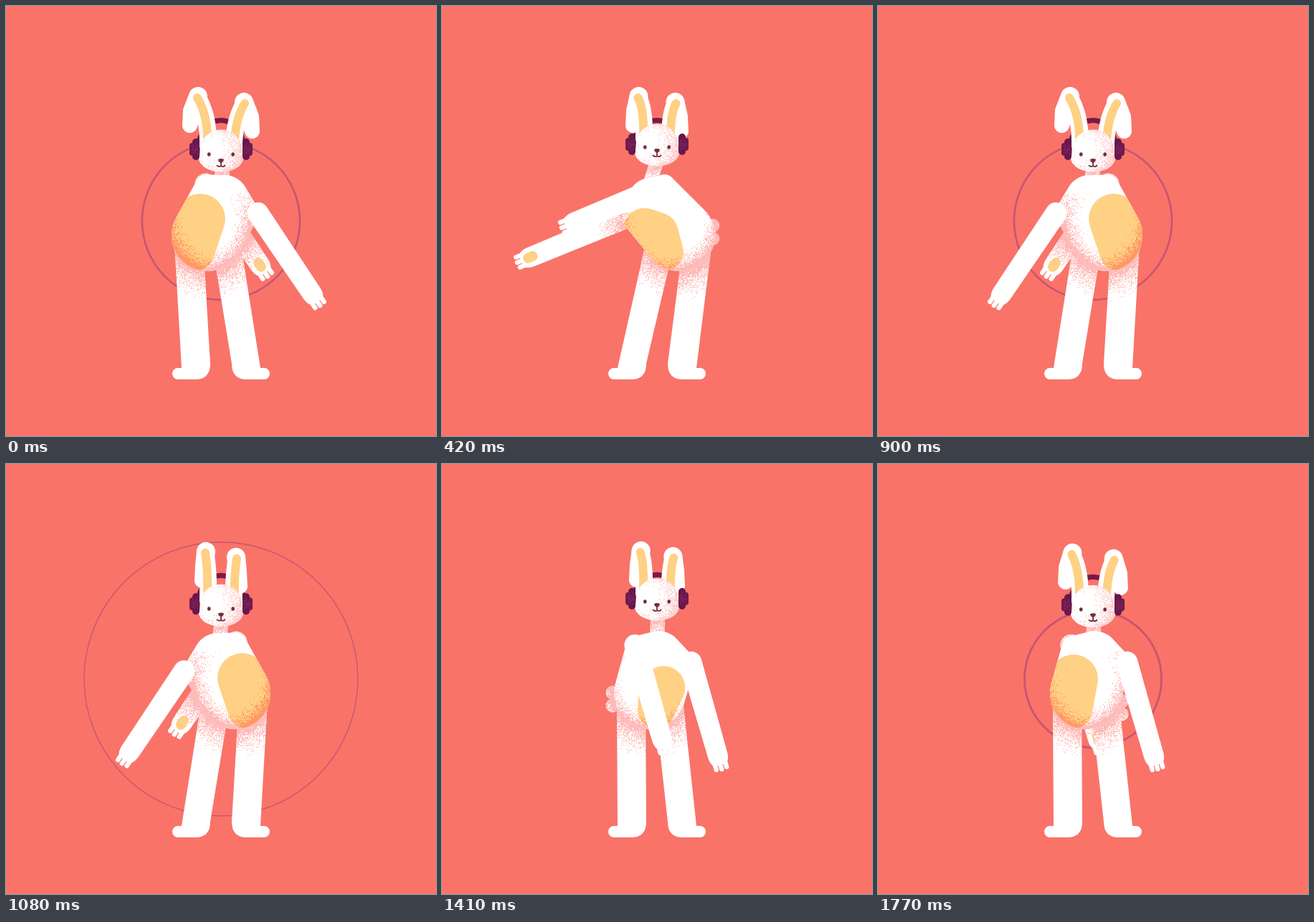
Animation, 600 px wide and 600 px high, one loop 1.8 s. Source, as an HTML page with a canvas:

```html
<!DOCTYPE html>
<html lang="en">
<head>
<meta charset="utf-8">
<title>Dancing rabbit</title>
<style>
html, body { margin: 0; width: 100%; height: 100%; overflow: hidden; background: #f97369; }
canvas { display: block; width: 600px; height: 600px; }
</style>
</head>
<body>
<canvas id="stage" width="600" height="600"></canvas>
<script>
const ctx = document.getElementById('stage').getContext('2d');
const LOOP = 1800, HALF = 900, STEP = 30, TAU = Math.PI * 2;
const WHITE = '#fff', YELLOW = '#ffd184', PLUM = '#661649', FACE = '#742e3e';
const clamp = (v, lo = 0, hi = 1) => Math.min(hi, Math.max(lo, v));
const mod = (a, n) => ((a % n) + n) % n;

let seed = 7;
const random = () => (seed = (seed * 16807) % 2147483647) / 2147483647;

// Round speckle texture whose density goes from 0 at radius r0 to 1 at r1
function speckle([r, g, b], r0, r1, lowerOnly) {
  const size = 260, mid = size / 2;
  const tile = document.createElement('canvas');
  tile.width = tile.height = size;
  const c = tile.getContext('2d');
  const img = c.createImageData(size, size);
  for (let i = 0; i < size * size; i++) {
    const x = i % size - mid, y = Math.floor(i / size) - mid;
    let density = clamp((Math.hypot(x, y) - r0) / (r1 - r0)) ** 2;
    if (lowerOnly) density *= clamp((y + 40) / 50);
    if (random() < density) img.data.set([r, g, b, 255], i * 4);
  }
  c.putImageData(img, 0, 0);
  return tile;
}
const PINK = [253, 186, 184];
const tex = {
  body: speckle(PINK, 44, 70, true),
  belly: speckle([255, 152, 100], 46, 72, true),
  shadow: speckle(PINK, 98, 54),
  head: speckle([253, 207, 206], 8, 46),
  cup: speckle([122, 32, 90], 16, 0)
};

// Cyclic keys: time, eye height, nod, ear spread
const KEYS = [
  [0, 207, 1, 1], [75, 211, 1.05, .6], [180, 202, .9, 0], [240, 199, .6, .41],
  [330, 197, .15, .6], [420, 197, 0, .41], [510, 192, 0, .12], [600, 193, 0, .2],
  [720, 197, 0, .41], [810, 198, .4, .5], [870, 203, .8, .7]
];
function track(time, col) {
  const n = KEYS.length;
  const key = i => {
    const k = KEYS[mod(i, n)];
    return [k[0] + Math.floor(i / n) * HALF, k[col]];
  };
  let i = n - 1;
  while (KEYS[i][0] > time) i--;
  const [a, b, c, d] = [key(i - 1), key(i), key(i + 1), key(i + 2)];
  const span = c[0] - b[0], u = (time - b[0]) / span;
  const m1 = (c[1] - a[1]) / (c[0] - a[0]) * span;
  const m2 = (d[1] - b[1]) / (d[0] - b[0]) * span;
  const u2 = u * u, u3 = u2 * u;
  return (2 * u3 - 3 * u2 + 1) * b[1] + (u3 - 2 * u2 + u) * m1 +
    (3 * u2 - 2 * u3) * c[1] + (u3 - u2) * m2;
}

// Convex outline around circles [x, y, r]
function hull(...circles) {
  const pts = [];
  for (const [x, y, r] of circles)
    for (let a = 0; a < 48; a++)
      pts.push([x + r * Math.cos(a * TAU / 48), y + r * Math.sin(a * TAU / 48)]);
  pts.sort((p, q) => p[0] - q[0] || p[1] - q[1]);
  const chain = list => {
    const out = [];
    for (const p of list) {
      while (out.length > 1) {
        const [a, b] = out.slice(-2);
        if ((b[0] - a[0]) * (p[1] - a[1]) - (b[1] - a[1]) * (p[0] - a[0]) > 0) break;
        out.pop();
      }
      out.push(p);
    }
    return out.slice(0, -1);
  };
  const path = new Path2D();
  for (const p of [...chain(pts), ...chain(pts.reverse())]) path.lineTo(...p);
  path.closePath();
  return path;
}

function fill(path, color) {
  ctx.fillStyle = color;
  ctx.fill(path);
}
function stroke(path, color, width) {
  ctx.strokeStyle = color;
  ctx.lineWidth = width;
  ctx.stroke(path);
}
function stamp(tile, x, y) {
  ctx.setTransform(1, 0, 0, 1, 0, 0);
  ctx.drawImage(tile, Math.round(x) - 130, Math.round(y) - 130);
}
function shaded(path, color, tile, x, y) {
  ctx.save();
  fill(path, color);
  ctx.clip(path);
  stamp(tile, x, y);
  ctx.restore();
}
function mirrored(draw) {
  draw(-1);
  ctx.save();
  ctx.translate(600, 0);
  ctx.scale(-1, 1);
  draw(1);
  ctx.restore();
}

const ARM = new Path2D('M-15 0A15 15 0 0 1 15 0L14 134Q14 143 10 148Q0 151-10 148Q-14 143-14 134Z');
for (const x of [-7.5, 0, 7.5]) {
  const finger = new Path2D();
  finger.roundRect(x - 3.2, 140, 6.4, 18.5 - Math.abs(x) * .15, 3.2);
  ARM.addPath(finger);
}
const PAD = new Path2D();
PAD.roundRect(-7, 125, 14, 21, 7);

function drawRing(time) {
  const u = mod(time + 360, HALF) / 740;
  if (u <= 0 || u >= 1) return;
  const ring = new Path2D();
  ring.arc(300, 300, 115 * (1 - Math.cos(Math.PI * u)), 0, TAU);
  stroke(ring, 'rgba(122,40,125,.4)', 5 * (1 - u));
}

function drawLegs(hip) {
  for (const side of [-1, 1]) {
    const at = x => 300 + side * x;
    const top = hip + side * 26;
    const leg = new Path2D();
    leg.moveTo(top + side * 20, 328);
    leg.lineTo(at(55), 505);
    leg.lineTo(at(60), 505);
    leg.arc(at(60), 513, 8, -Math.PI / 2, Math.PI / 2, side < 0);
    leg.lineTo(at(36), 521);
    leg.quadraticCurveTo(at(15), 521, at(15), 499);
    leg.lineTo(top - side * 20, 328);
    shaded(leg, WHITE, tex.shadow, hip, 316);
  }
}

function drawArm([x, y], angle, behind, cx, cy) {
  ctx.save();
  ctx.translate(x, y);
  ctx.rotate(-angle);
  fill(ARM, WHITE);
  if (behind) {
    fill(PAD, YELLOW);
    ctx.clip(ARM);
    stamp(tex.shadow, cx, cy);
  }
  ctx.restore();
}

function drawEar(eye, nod, spread) {
  const tip = [279 - 11 * spread, eye - 71 - 10 * nod];
  const flap = [273.5 - 17 * spread, eye - 30.5 - 10 * nod];
  fill(hull([...tip, 13], [flap[0] + 3, flap[1] - 20, 12.5], [...flap, 10.5]), WHITE);
  const curve = (x, bottom, top) => {
    const path = new Path2D();
    path.moveTo(x, bottom);
    path.quadraticCurveTo(x + 1, eye - 54, tip[0] - 1, top);
    return path;
  };
  stroke(curve(282, eye - 12, tip[1] + 1), WHITE, 24);
  stroke(curve(281, eye - 15, tip[1] + 2), YELLOW, 12);
}

function drawHead(time) {
  const eye = track(time, 1), nod = track(time, 2), spread = track(time, 3);
  const mid = eye - 3 - 2 * nod, cup = eye - 4 - 3 * nod;
  const band = new Path2D();
  band.ellipse(300, cup, 32, cup - (eye - 37.5 - 10 * nod), 0, Math.PI, TAU);
  stroke(band, '#7a1849', 7);
  mirrored(side => drawEar(eye + (side > 0 ? 8 : 0), nod, spread));

  const head = new Path2D();
  head.arc(300, mid, 29.5, 0, TAU);
  const cheeks = new Path2D();
  cheeks.ellipse(300, mid + 10, 31, 19.5, 0, 0, TAU);
  head.addPath(cheeks);
  shaded(head, WHITE, tex.head, 286, mid - 4);

  for (const side of [-1, 1]) {
    const pad = new Path2D();
    pad.roundRect(300 + side * 35 - 5, cup - 15, 10, 30, 5);
    pad.roundRect(300 + side * 39 - 5, cup - 9, 10, 18, 4);
    shaded(pad, PLUM, tex.cup, 300 + side * 37, cup);
    const dot = new Path2D();
    dot.ellipse(300 + side * 16.7, eye, 2.3, 2.7, 0, 0, TAU);
    fill(dot, FACE);
  }
  const nose = eye + 5 + 4 * nod;
  ctx.save();
  ctx.translate(300, nose);
  fill(new Path2D('M-4-1Q-4-3 0-3Q4-3 4-1Q3 2 0 3Q-3 2-4-1Z'), FACE);
  stroke(new Path2D('M0 2V7M-5.5 6.5Q-4 9 0 7.5Q4 9 5.5 6.5'), FACE, 1.8);
  ctx.restore();
}

function drawNeck(mid, lean) {
  const x = 300 + 12 * lean ** 3;
  const neck = new Path2D();
  neck.moveTo(291, mid + 20);
  neck.lineTo(311, mid + 20);
  neck.lineTo(x + 10, 248);
  neck.lineTo(x - 10, 248);
  shaded(neck, WHITE, tex.shadow, 304, mid - 28);
}

function draw(t) {
  const time = t % HALF;
  const phase = TAU * (t - 90) / 600;
  const s = Math.cos(phase);
  const angle = (67.3 * s + 5.94 * Math.cos(3 * phase)) * Math.PI / 180;
  const hip = 300 - 32.5 * s, hipY = 320;
  const nod = track(time, 2);

  // The rabbit faces right for one half of the loop and left for the other
  const turn = mod(t - 540, LOOP);
  const dir = turn < HALF ? 1 : -1;
  const edge = Math.min(turn % HALF, HALF - turn % HALF);
  const face = dir * clamp(edge / 66) * (1 - .2 * nod);
  const leftFront = turn < HALF || turn >= LOOP - 60;
  const rightFront = turn >= HALF - 60;

  const shoulder = side => {
    const q = side * s;
    return [300 + side * (40 - 10 * s * s) + 28 * s - 7 * s ** 3,
      260 + 15 * Math.abs(s) + 40 * q - 16 * q ** 3];
  };
  const arms = [[-1, leftFront], [1, rightFront]].map(([side, front]) => ({ side, front, at: shoulder(side) }));
  const cx = (hip + (arms[0].at[0] + arms[1].at[0]) / 2) / 2;
  const cy = 290 + 7 * Math.abs(s);

  ctx.setTransform(1, 0, 0, 1, 0, 0);
  ctx.lineCap = 'round';
  ctx.fillStyle = '#f97369';
  ctx.fillRect(0, 0, 600, 600);
  drawRing(time);

  const away = -dir * (hip - 300);
  const reach = 62 - (away < 0 ? -1.2 * away : .5 * away);
  const tailX = hip - clamp(2 * face, -1, 1) * reach, tailY = 334 - .6 * away;
  const tail = new Path2D();
  for (const dy of [-9, 9]) {
    tail.moveTo(tailX + 9.5, tailY + dy);
    tail.arc(tailX, tailY + dy, 9.5, 0, TAU);
  }
  shaded(tail, WHITE, tex.shadow, hip, hipY);

  for (const a of arms) if (!a.front) drawArm(a.at, angle, true, cx, cy);
  drawLegs(hip);
  const mid = track(time, 1) - 3 - 2 * nod;
  drawNeck(mid, s);

  const joints = arms.map(({ side, at: [x, y] }) => {
    const low = side * s;
    return [x - side * 10 * Math.max(0, low), y, 11 - 4 * low];
  });
  const body = hull(...joints, [300 + 8 * s, 264 + 10 * Math.abs(s), 34], [hip, hipY, 50]);
  shaded(body, WHITE, tex.body, hip + face * 14, 298);
  const lean = hip - 300;
  const belly = hull(
    [hip + face * 28 - lean * .65, hipY - 8 - 15 * nod, 30 + 5 * nod],
    [hip + face * 30, hipY - 3, 29],
    [hip + face * 20, hipY + 23, 26]);
  ctx.save();
  ctx.clip(body);
  shaded(belly, YELLOW, tex.belly, hip - face * 6 - lean * .6, 298);
  ctx.restore();

  for (const a of arms) if (a.front) drawArm(a.at, angle, false);
  drawHead(time);
}

const start = performance.now();
function tick() {
  const t = (performance.now() - start) % LOOP;
  draw(Math.floor(t / STEP) * STEP);
  requestAnimationFrame(tick);
}
tick();
</script>
</body>
</html>
```
